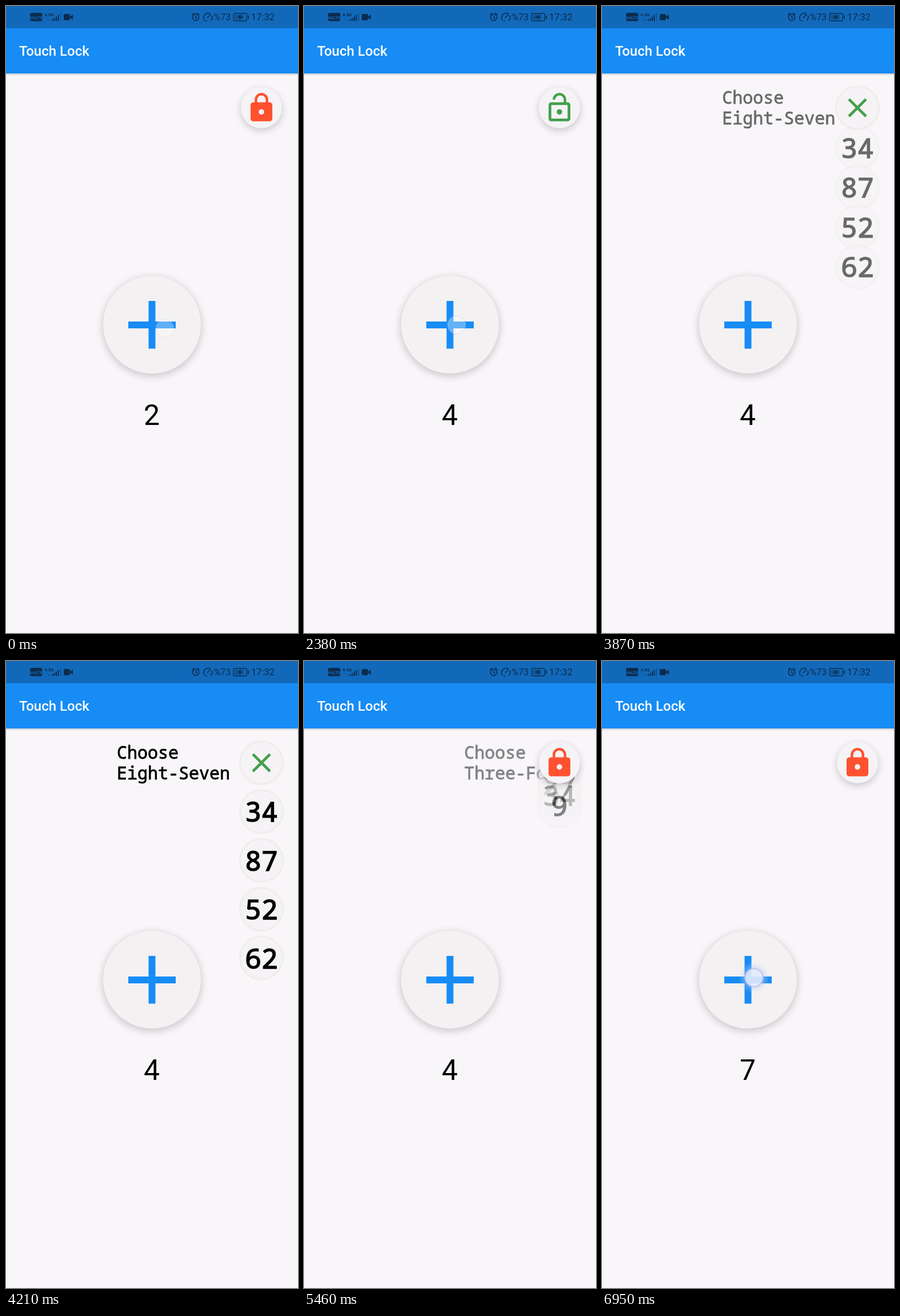
Animation, 511 px wide and 1097 px high, one loop 6980 ms. Source, as an HTML page:

```html
<!DOCTYPE html>
<html lang="en">
<head>
<meta charset="utf-8">
<title>Touch Lock</title>
<style>
html, body { margin: 0; width: 100%; height: 100%; overflow: hidden; background: #f8f6f9; }
svg { display: block; width: 100vw; height: 100vh; }
text { font-family: Roboto, sans-serif; }
.mono { font-family: "Noto Sans Mono", "DejaVu Sans Mono", monospace; fill: #000; stroke: #000; }
.label { font-size: 30px; stroke-width: .8px; }
.code { font-size: 48px; stroke-width: 1.5px; text-anchor: middle; }
.bar { fill: #0b2c4e; }
.line { fill: none; stroke: #0b2c4e; stroke-width: 1.6; }
</style>
</head>
<body>
<svg viewBox="0 0 511 1097" preserveAspectRatio="none">
  <defs>
    <filter id="soft" x="-30%" y="-30%" width="160%" height="160%"><feGaussianBlur stdDeviation="6"/></filter>
    <filter id="ring" x="-20%" y="-20%" width="140%" height="140%"><feGaussianBlur stdDeviation="1"/></filter>
    <linearGradient id="drop" x2="0" y2="1">
      <stop stop-color="#888" stop-opacity=".38"/><stop offset="1" stop-color="#888" stop-opacity="0"/>
    </linearGradient>
    <radialGradient id="glow">
      <stop offset=".5" stop-color="#9cb6f4" stop-opacity=".7"/>
      <stop offset=".72" stop-color="#b9c8f4" stop-opacity=".3"/>
      <stop offset="1" stop-color="#d0d8f8" stop-opacity="0"/>
    </radialGradient>
  </defs>
  <rect width="511" height="1097" fill="#f8f6f9"/>
  <rect y="118" width="511" height="4" fill="url(#drop)"/>
  <rect width="511" height="118" fill="#178cf5"/>
  <rect width="511" height="39" fill="#1269ba"/>
  <text x="23" y="86.5" font-size="24" font-weight="500" fill="#fff">Touch Lock</text>

  <g class="bar">
    <rect x="42" y="12" width="21.5" height="14.5" rx="3"/>
    <text x="52.7" y="22.8" font-size="8" font-weight="700" text-anchor="middle" fill="#1269ba">VoLTE</text>
    <text x="67.5" y="18" font-size="7.5" font-weight="700">4.5G</text>
    <path d="M80 23h2v3h-2zM83.500 21h2v5h-2zM87 18.500h2v7.500h-2zM90.500 15.500h2v10.500h-2z"/>
    <path d="M95 12.500h1.200v13.500h-1.200zM70 21.500h4v1h-4zM73 24.500h4v1h-4z" opacity=".5"/>
    <rect x="101" y="14" width="11" height="11" rx="2"/>
    <path d="M111 19.500l6-4.500v9z"/>
    <text x="363.500" y="25" font-size="16">%73</text>
    <text x="429" y="25" font-size="16.500">17:32</text>
    <rect x="400.500" y="15.500" width="15" height="8" opacity=".4"/>
    <path d="M423 16.500h2v6h-2z"/>
    <path d="M411 14.500l-5.500 5.500h3.500l-1 4.500 5.500-6h-3.500z"/>
  </g>
  <g class="line">
    <circle cx="332" cy="19.800" r="5.600"/>
    <path d="M332 16.500v3.800l2.500 1.500M325.500 15.500l4-3.300M338.500 15.500l-4-3.300"/>
    <path d="M347.500 25.500a8 8 0 0 1 10-12M360 16.500a8 8 0 0 1-1.500 9M352 21l6-6.500M349 26.300h3"/>
    <rect x="398.200" y="13" width="23" height="13" rx="2" stroke-width="1.300"/>
  </g>

  <g id="plus">
    <circle cx="255.500" cy="561" r="88" fill="#77727c" opacity=".3" filter="url(#soft)"/>
    <circle cx="255.500" cy="557.500" r="85.500" fill="#f3f1f2"/>
    <path d="M249.500 516h12v36h35.500v12h-35.500v35.500h-12v-35.500h-35.500v-12h35.500z" fill="#178cf5"/>
  </g>
  <text id="count" x="255" y="732.500" font-size="50" text-anchor="middle"></text>

  <g id="menu">
    <g id="label"><text class="mono label" y="171">Choose</text><text class="mono label" y="206.500" id="word"></text></g>
  </g>
  <circle id="shade" cx="447" cy="182" r="37" fill="#77727c" opacity=".32" filter="url(#soft)"/>
  <circle id="rim" cx="447" cy="178" r="37" fill="none" stroke="#ebe8e7" stroke-width="3" filter="url(#ring)"/>
  <circle cx="447" cy="178" r="36" fill="#f5f3f5"/>
  <path id="icon" transform="translate(418.500 149.500) scale(2.380)"/>

  <g id="touch">
    <circle id="halo" r="27" fill="url(#glow)"/>
    <circle id="disc" r="15.500" fill="#fff"/>
    <circle id="edge" r="15.500" fill="none" stroke="#c4c6ea" stroke-width="1.800"/>
  </g>
</svg>
<script>
const LOOP = 6980, OPEN = 3700, CLOSE = 5302, SLIDE = 300, FADE = 240;
const $ = id => document.getElementById(id);
const clamp = v => Math.max(0, Math.min(1, v));
const set = (el, attrs) => { for (const k in attrs) el.setAttribute(k, attrs[k]); };

const icons = {
  lock: ['#ff5130', 'M18 8h-1V6c0-2.760-2.240-5-5-5S7 3.240 7 6v2H6c-1.100 0-2 .9-2 2v10c0 1.100.9 2 2 2h12c1.100 0 2-.9 2-2V10c0-1.100-.9-2-2-2zm-6 9c-1.100 0-2-.9-2-2s.9-2 2-2 2 .9 2 2-.9 2-2 2zm3.100-9H8.900V6c0-1.710 1.390-3.100 3.100-3.100 1.710 0 3.100 1.390 3.100 3.100v2z'],
  open: ['#43a04b', 'M12 17c1.100 0 2-.9 2-2s-.9-2-2-2-2 .9-2 2 .9 2 2 2zm6-9h-1V6c0-2.760-2.240-5-5-5S7 3.240 7 6h1.900c0-1.710 1.390-3.100 3.100-3.100 1.710 0 3.100 1.390 3.100 3.100v2H6c-1.100 0-2 .9-2 2v10c0 1.100.9 2 2 2h12c1.100 0 2-.9 2-2V10c0-1.100-.9-2-2-2zm0 12H6V10h12v10z'],
  close: ['#43a04b', 'M19 6.410L17.590 5 12 10.590 6.410 5 5 6.410 10.590 12 5 17.590 6.410 19 12 13.410 17.590 19 19 17.590 13.410 12z']
};

// down time, up time, x, y
const taps = [
  [-210, -90, 278, 564], [120, 210, 274, 560], [370, 460, 272, 556],
  [1040, 1130, 441, 184],
  [1950, 2040, 264, 556], [2210, 2300, 267, 558], [2470, 2560, 266, 560],
  [2730, 2820, 269, 559], [2990, 3080, 268, 561],
  [3510, 3610, 444, 184],
  [4880, 5020, 448, 350],
  [6160, 6250, 266, 556], [6380, 6470, 268, 552], [6600, 6690, 265, 550],
  [6860, 7000, 266, 554]
];
const counts = [[0, 2], [210, 3], [460, 4], [6250, 5], [6470, 6], [6690, 7]];
const last = (list, t) => list.filter(e => e[0] <= t).pop();

const NS = 'http://www.w3.org/2000/svg';
const make = (tag, attrs, parent) => {
  const el = document.createElementNS(NS, tag);
  set(el, attrs);
  return parent.appendChild(el);
};
const items = [1, 2, 3, 4].map(() => {
  const g = make('g', {}, $('menu'));
  make('circle', { r: 37, fill: 'none', stroke: '#ebe8e7', 'stroke-width': 3, filter: 'url(#ring)' }, g);
  make('circle', { r: 36, fill: '#f5f3f5' }, g);
  return { g, text: make('text', { class: 'mono code', y: 18 }, g) };
});

function drawMenu(t) {
  const closing = t >= CLOSE;
  const u = clamp((t - (closing ? CLOSE : OPEN)) / SLIDE);
  const out = 1 - (1 - u) ** 2;
  const p = closing ? 1 - out : out;
  const alpha = closing ? 1 - u : u;
  const codes = closing ? ['65', '27', '34', '9'] : ['34', '87', '52', '62'];
  const word = closing ? 'Three-Four' : 'Eight-Seven';
  $('menu').style.display = alpha > 0 ? '' : 'none';
  $('word').textContent = word;
  const x = 392 - word.length * 18 + 87.5 * (1 - p);
  set($('label'), { transform: `translate(${x} 0)`, opacity: alpha });
  items.forEach(({ g, text }, i) => {
    text.textContent = codes[i];
    set(g, { transform: `translate(447 ${178 + 85.4 * (i + 1) * p})`, opacity: alpha });
  });
}

function drawIcon(t) {
  const name = t < 1130 || t >= CLOSE ? 'lock' : t < OPEN ? 'open' : 'close';
  const [fill, d] = icons[name];
  set($('icon'), { fill, d });
  $('shade').style.display = name === 'close' ? 'none' : '';
  $('rim').style.display = name === 'close' ? '' : 'none';
}

function drawTouch(t) {
  const [down, up, x, y] = last(taps, t);
  const rise = clamp((t - down) / 70);
  const gone = clamp((t - up) / FADE);
  set($('touch'), { transform: `translate(${x} ${y})` });
  set($('halo'), { opacity: rise * clamp(1 - gone * 9) });
  set($('disc'), { opacity: rise * (t < up ? .65 : .5) * (1 - gone) });
  set($('edge'), { opacity: rise * clamp(1 - gone * 2.2) });
}

function draw(t) {
  $('count').textContent = last(counts, t)[1];
  drawMenu(t);
  drawIcon(t);
  drawTouch(t);
}

const start = performance.now();
function tick(now) {
  draw(Math.max(0, now - start) % LOOP);
  requestAnimationFrame(tick);
}
draw(0);
requestAnimationFrame(tick);
</script>
</body>
</html>
```
